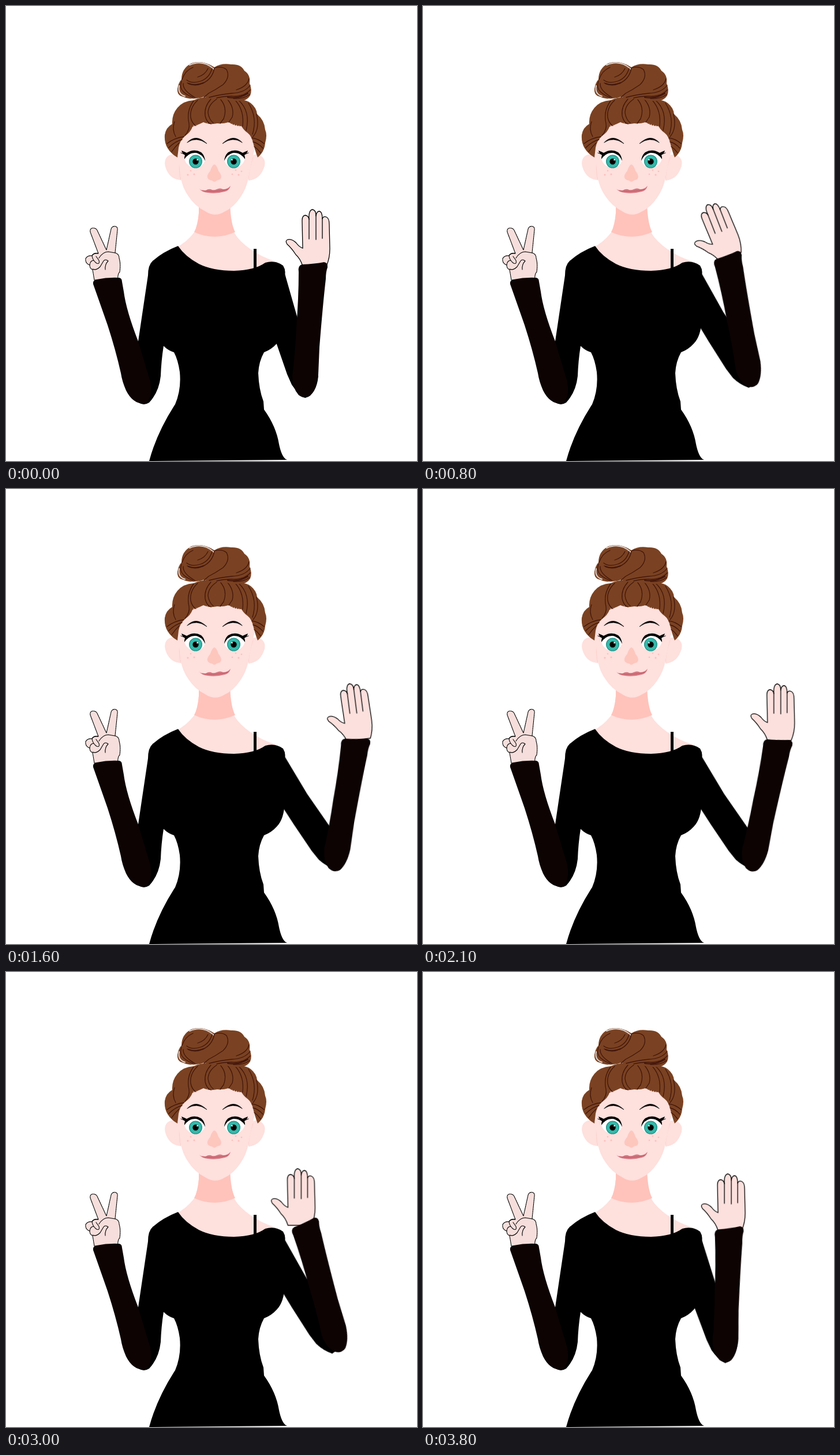
Write an HTML page that moves like this. It is 712x787 px and loops after 3.9 s.

```html
<!DOCTYPE html>
<html lang="en">
<head>
<meta charset="utf-8">
<title>Waving woman</title>
<style>
  html, body { margin: 0; width: 100%; height: 100%; overflow: hidden; background: #fff; }
  svg { display: block; width: 100%; height: 100%; }
  path, ellipse, circle { stroke-linecap: round; stroke-linejoin: round; }
  .line { fill: none; stroke: #000; }
  .skin { fill: #fee0dd; }
  .hair { fill: #7a4222; }
  .strand { fill: none; stroke: #43160b; stroke-width: 1.3; }
  .sleeve { fill: #0d0303; }
  .hand { fill: #fbe0dd; stroke: #000; stroke-width: 1.3; }
  .peace { fill: #f5dedb; stroke: #000; stroke-width: 1.1; }

  /* 39 poses of 100 ms: raise, swing out, swing in, lower */
  .upper, .fore, .palm { animation: 3900ms steps(10) -2ms infinite; }
  .upper { transform-origin: 466px 470px; animation-name: upper; }
  .fore { transform-origin: 518px 652px; animation-name: fore; }
  .palm { transform-origin: 531px 428px; animation-name: palm; }
  @keyframes upper {
    0% { transform: rotate(0deg); animation-timing-function: steps(9); }
    23.0769%, 74.359% { transform: rotate(-15deg); }
    100% { transform: rotate(0deg); }
  }
  @keyframes fore {
    0% { transform: translate(0px, 0px) rotate(0deg); animation-timing-function: steps(9); }
    23.0769% { transform: translate(54px, -20px) rotate(-16.8deg); }
    48.7179% { transform: translate(54px, -14px) rotate(15.4deg); }
    74.359% { transform: translate(60px, -21px) rotate(-21.6deg); }
    100% { transform: translate(0px, 0px) rotate(0deg); }
  }
  /* cancels the forearm turn, plus a tilt at the end of the raise */
  @keyframes palm {
    0% { transform: translate(0px, 0px) rotate(0deg); animation-timing-function: steps(9); }
    23.0769% { transform: translate(0px, 0px) rotate(-7.2deg); }
    48.7179% { transform: translate(-4px, -3px) rotate(-15.4deg); }
    74.359% { transform: translate(-4px, -3px) rotate(21.6deg); }
    100% { transform: translate(0px, 0px) rotate(0deg); }
  }
</style>
</head>
<body>
<svg viewBox="0 0 712 787">
  <!-- neck and shoulders -->
  <path class="skin" d="M334 340V358Q332 386 324 394Q312 409 296 417L330 460H430L470 443Q442 434 424 421Q404 407 396 393Q389 378 388 340Z"/>
  <path fill="#ffc3bb" d="M334 340V358Q332 380 326 391Q343 399 362 399Q382 398 397 391Q389 376 388 340Z"/>

  <!-- ears and face -->
  <path class="skin" d="M302 262Q290 252 280 260Q272 268 277 281Q284 300 303 301Z"/>
  <path class="skin" d="M421 262Q434 252 444 261Q452 269 446 282Q439 300 420 302Z"/>
  <path fill="none" stroke="#fccfca" d="M301 268Q299 286 303 301M428 262Q421 280 420 300"/>
  <path class="skin" d="M298 196H430V250Q423 280 420 297Q417 315 406 331Q394 349 378 356Q362 366 345 355Q327 346 316 329Q306 315 303 298L297 250Z"/>

  <!-- hair -->
  <path class="hair" d="M297 262Q286 256 280 246Q274 236 275 223Q277 210 288 204Q287 188 297 176Q307 164 325 163Q340 156 362 158Q383 157 398 163Q415 161 424 168Q434 176 435 187Q448 198 449 214Q453 223 449 237Q448 252 436 262Q432 252 429 240Q426 225 418 219Q412 215 408 208Q395 208 386 201Q375 204 366 203Q352 206 342 201Q332 206 323 209Q320 218 310 225Q301 233 299 245Z"/>
  <path fill="none" stroke="#fee0dd" stroke-width="5" stroke-dasharray="1 3" style="stroke-linecap:butt" d="M325 209L349 204M383 204L407 210"/>
  <path class="strand" d="M325 164Q312 182 317 203Q319 214 310 224M332 163Q318 176 320 193Q322 203 329 207M355 161Q343 174 345 190Q348 202 355 204M365 161Q350 171 350 185Q352 197 359 202M372 162Q384 176 377 195L371 203M384 162Q396 176 392 192L386 201M398 164Q413 181 410 208M403 163Q424 182 416 215M420 168Q436 193 427 222M434 187Q440 212 428 226M292 200Q287 214 294 226M279 238Q292 228 308 226M282 245Q293 234 305 231M287 252Q293 243 300 237M447 238Q438 230 426 228M445 246Q437 237 428 235M441 254Q436 247 430 243"/>
  <path class="hair" d="M307 157Q296 155 297 143Q299 132 304 127Q304 108 321 99Q341 93 361 106Q373 98 390 101Q407 100 413 112Q424 119 422 134Q427 145 423 155Q416 166 401 164Q386 165 374 159Q359 162 343 157Q333 161 322 160Q314 161 307 157Z"/>
  <path fill="none" stroke="#ddd2cd" stroke-width="2" d="M318 102Q341 92 360 109M300 138Q297 152 310 156"/>
  <path class="strand" d="M361 108Q357 127 340 134Q325 139 314 133M357 108Q352 125 337 130Q322 135 313 128M350 108Q345 119 332 123M305 127Q310 112 324 106M304 130Q300 142 308 149Q315 155 324 158M307 134Q306 146 327 158M361 107Q374 103 382 110Q389 123 376 136Q363 145 351 151L343 158M423 137Q414 150 391 151Q370 153 352 158M423 145Q413 157 391 156Q376 156 365 159M422 153Q412 161 394 160M421 126Q418 139 399 145"/>
  <path class="strand" stroke-width="2.2" style="stroke-width:2.2" d="M342 133Q328 139 316 134M419 151Q404 161 384 158"/>

  <!-- eyes -->
  <g id="eye">
    <path fill="#fff" d="M309 264Q314 251 328 251Q341 252 345 267Q342 278 329 280Q313 279 309 264Z"/>
    <circle cx="328.500" cy="269" r="11.500" fill="#238f86"/>
    <circle cx="328.500" cy="269" r="10.300" fill="#35b9ab"/>
    <circle cx="328.500" cy="269" r="5.200"/>
    <circle cx="331.500" cy="266" r="1.300" fill="#fff"/>
    <path d="M304 250Q309 252 313 254Q326 246 338 253Q344 258 345 268Q340 256 329 254Q317 253 309 265Q309 260 310 258Q305 255 304 250Z"/>
    <path class="line" stroke-width="1" d="M308 256L303 254"/>
    <path d="M314 236Q329 220 348 238Q330 225 314 236Z" stroke="#000" stroke-width=".7"/>
  </g>
  <use href="#eye" transform="matrix(-1 0 0 1 723 0)"/>

  <!-- nose, freckles, mouth -->
  <path fill="#fdc7be" d="M361 274Q365 275 368 285Q376 295 371 300Q367 301 365 302Q361 306 357 302Q353 302 350 299Q346 294 354 285Q357 275 361 274Z"/>
  <g fill="#fcc0bc">
    <circle cx="315" cy="292" r="1.600"/><circle cx="320" cy="285" r="1.300"/><circle cx="326" cy="291" r="1.600"/>
    <circle cx="392" cy="291" r="1.300"/><circle cx="398" cy="284" r="1.300"/><circle cx="403" cy="292" r="1.600"/><circle cx="408" cy="286" r="1.300"/>
  </g>
  <path fill="#d47681" d="M335 316Q339 320 346 319Q352 315 357 318Q361 319 365 317Q371 314 376 317Q384 317 389 311Q387 319 379 321Q364 325 350 323Q339 322 335 316Z"/>
  <path fill="none" stroke="#b9535f" stroke-width=".8" d="M340 319Q361 323 384 317"/>

  <!-- dress and both upper arms -->
  <path d="M298 415Q310 433 334 446Q358 458 395 458Q431 457 449 444Q466 439 480 449Q485 457 483 465V540Q482 571 469 584Q460 594 447 599Q438 615 437 635Q438 663 446 684L447 698Q468 727 473 758Q478 782 487 785L248 787Q261 739 291 692L293 689Q304 663 301 633Q298 612 291 599Q281 596 273 588Q269 613 268 640Q265 668 248 686Q235 694 224 680L218 600L229 580L246 466Q246 448 254 441Q272 425 298 415Z"/>
  <path class="line" stroke-width="5" style="stroke-linecap:butt" d="M431.500 420V456"/>
  <path class="upper" d="M450 446Q470 438 481 452Q482 460 485 470L505 540L541 640Q538 672 518 678Q504 669 495 655L487 637L469 585L448 520Q441 470 450 446Z"/>

  <!-- peace sign -->
  <path class="peace" stroke-dasharray="3 .8" d="M153 474L150 456Q145 454 145 448Q137 445 138 437Q141 431 149 432Q152 426 160 428L146 391Q145 384 151 384Q156 384 158 388L174 422L182 386Q183 381 189 381Q194 382 193 388L189 427Q196 429 196 436Q199 446 197 460Q193 464 194 474Z"/>
  <path class="line" stroke-width="1.100" d="M160 428Q151 427 149 432Q150 440 157 445Q163 447 161 440L156 433M145 448Q146 440 152 440M150 455Q156 458 163 451L169 441M161 436Q168 425 177 425L189 427M169 441Q172 437 177 441M177 441Q171 447 172 456"/>
  <path class="sleeve" d="M151 481Q150 474 157 473Q176 469 196 470Q201 471 201 477L204 494Q208 526 229 580L250 650Q255 678 241 688Q220 689 208 665Q201 649 199 635Q190 595 176 552Q162 512 151 481Z"/>

  <!-- waving arm -->
  <g class="fore">
    <g class="palm">
      <path class="hand" d="M514 450Q510 437 502 430Q495 419 487 412Q483 406 488 404Q495 402 503 410Q507 416 514 419L513 371Q513 362 519 362Q524 363 525 369Q524 353 531 352Q537 353 537 363Q538 355 543 355Q548 356 548 368Q550 363 555 365Q560 367 560 378L561 420Q561 436 555 450Z"/>
      <path class="line" stroke-width="1.300" d="M525 368V403M537 362V404M548 367V402"/>
    </g>
    <path class="sleeve" d="M507 460Q505 449 513 447Q535 446 551 443Q558 444 557 452Q554 460 554 472Q549 515 543 590L541 637Q538 662 527 674Q518 681 507 673Q496 661 496 640Q501 600 503 555Q507 505 507 460Z"/>
  </g>
</svg>
</body>
</html>
```
